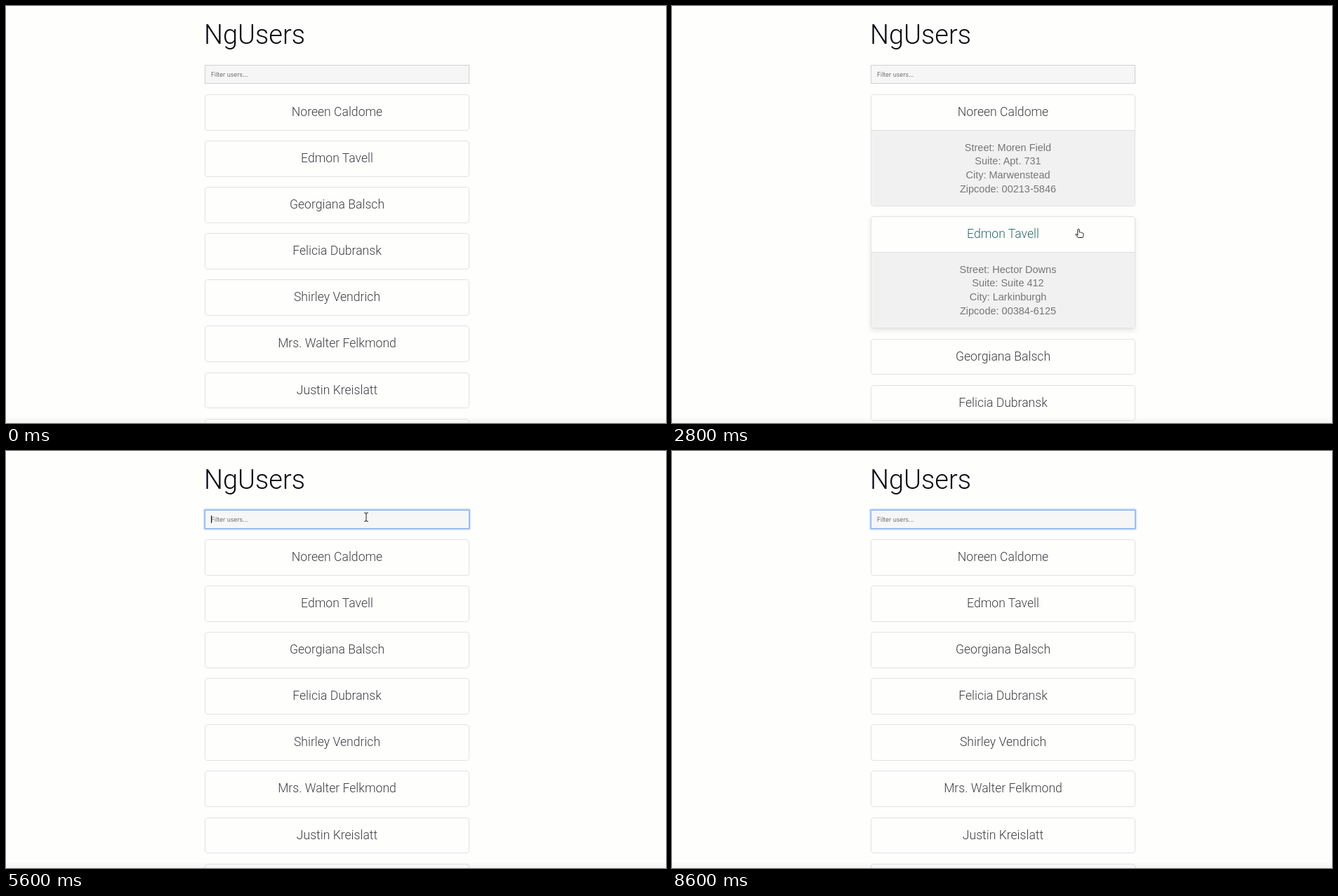
Write an HTML page that moves like this. It is 940 by 595 pixels and loops after 8800 ms.

```html
<!DOCTYPE html>
<html lang="en">
<head>
<meta charset="utf-8">
<title>NgUsers</title>
<style>
* { box-sizing: border-box; margin: 0; padding: 0; }
html, body { width: 100%; height: 100%; overflow: hidden; background: #fefefd; }
body { position: relative; font: 300 17.6px Roboto, sans-serif; color: #3f3f44; }
h1 { position: absolute; left: 282px; top: 16px; font-size: 38px; font-weight: 300; line-height: 50px; color: #0b0b12; }
#filter { position: absolute; left: 283px; top: 84px; width: 377px; height: 27px; padding-left: 8px;
  border: 1px solid #d0d0d4; background: #f6f6f7; font: 400 8.6px/26px Inter, sans-serif; color: #6c6c6c; }
#filter.focus { border-color: #86b0ef; box-shadow: 0 0 2px 1px #8fb6f2; }
#filter.typed { color: #111; }
#caret { position: absolute; top: 7px; width: 1px; height: 11px; background: #111; }
#list { position: absolute; left: 283px; top: 126px; width: 377px; }
.card { margin-bottom: 14.6px; border: 1px solid #e2e2e4; border-radius: 4px; overflow: hidden; text-align: center; }
.card.hover { box-shadow: 0 3px 7px rgba(0, 0, 0, .1); }
.card.hover .name { color: #2f6b6a; }
.name { height: 49.5px; line-height: 48.5px; }
.details { display: none; height: 108.2px; padding: 15px 0 0 14px; border-top: 1px solid #dedee0; background: #f1f1f1;
  font: 400 14.5px/19.7px "Liberation Sans", Arial, sans-serif; color: #777; white-space: pre-line; }
.open .details { display: block; }
#fade { position: absolute; left: 0; right: 0; bottom: 0; height: 10px; pointer-events: none;
  background: linear-gradient(transparent, rgba(0, 0, 0, .04)); }
#cursor { position: absolute; left: 0; top: 0; overflow: visible; pointer-events: none; }
#cursor path { stroke-linejoin: round; stroke-linecap: round; }
</style>
</head>
<body>
<h1>NgUsers</h1>
<div id="filter"><span id="query"></span><i id="caret"></i></div>
<div id="list"></div>
<div id="fade"></div>
<svg id="cursor" width="1" height="1">
  <path id="hand" fill="#fff" stroke="#222" d="M-1.2 9V1Q0-1 1.2 1V5Q2.6 4 3.4 5.4Q5 4.7 5.5 6Q7 5.6 7 7.2V9.5Q6.6 11 5.9 12.5H-.6L-4.2 8Q-3.8 6-1.2 9"/>
  <path id="beam" fill="none" stroke="#222" d="M-2.5-6Q0-6 0-4.5Q0-6 2.5-6M0-5V6M-2.5 6.5Q0 6.5 0 5Q0 6.5 2.5 6.5"/>
  <path id="arrow" fill="#111" stroke="#fff" stroke-width=".8" d="M0 0V13L3 10.2L5 14.8L7 14L5 9.5H9Z"/>
</svg>
<script>
const $ = id => document.getElementById(id);
const LOOP = 8800, STEP = 200, FOCUS = 5600, BLINK = 600;

const users = [
  { name: "Noreen Caldome", address: ["Moren Field", "Apt. 731", "Marwenstead", "00213-5846"], open: [2000, 4000] },
  { name: "Edmon Tavell", address: ["Hector Downs", "Suite 412", "Larkinburgh", "00384-6125"], open: [2800, 4600] },
  ...["Georgiana Balsch", "Felicia Dubransk", "Shirley Vendrich", "Mrs. Walter Felkmond", "Justin Kreislatt",
    "Frederic Halvorsund V", "Odette Marchen", "Wilhelmina DuBerne"].map(name => ({ name }))
];

// Places where the pointer turns or rests; it eases between them
const stops = [
  { at: 200, x: 832, y: 44 },
  { at: 800, x: 302, y: 540 },
  { at: 1200, x: 580, y: 337 },
  { at: 1600, x: 561, y: 152 },
  { at: 2000, x: 561, y: 152 },
  { at: 2800, x: 579, y: 318 },
  { at: 3600, x: 580, y: 53 },
  { at: 3800, x: 577, y: 136 },
  { at: 4800, x: 593, y: 233 },
  { at: FOCUS, x: 513, y: 94 },
  { at: 6200, x: 540, y: 335 },
  { at: 7000, x: 560, y: 53 }
];

const within = (t, [from, to]) => t >= from && t < to;
const ease = k => k * k * (3 - 2 * k);
const show = (el, visible) => el.style.display = visible ? "" : "none";

function add(parent, className, text = "") {
  const el = document.createElement("div");
  el.className = className;
  el.textContent = text;
  return parent.appendChild(el);
}

for (const user of users) {
  user.card = add($("list"), "card");
  add(user.card, "name", user.name);
  if (user.address) {
    const labels = ["Street", "Suite", "City", "Zipcode"];
    add(user.card, "details", labels.map((label, i) => `${label}: ${user.address[i]}`).join("\n"));
  }
}

function pointerAt(t) {
  const next = stops.findIndex(stop => stop.at > t);
  if (next < 1) return null;
  const a = stops[next - 1], b = stops[next];
  const k = ease((t - a.at) / (b.at - a.at));
  return [a.x + (b.x - a.x) * k, a.y + (b.y - a.y) * k];
}

function queryAt(t) {
  if (within(t, [7400, 8200])) return "ba";
  return within(t, [7000, 8400]) ? "b" : "";
}

function drawFilter(t, query) {
  const focused = t >= FOCUS;
  $("filter").classList.toggle("focus", focused);
  $("filter").classList.toggle("typed", query !== "");
  $("query").textContent = query || "Filter users...";
  $("caret").style.left = 8 + (query ? $("query").offsetWidth : 0) + "px";
  show($("caret"), focused && Math.floor((t - FOCUS) / BLINK) % 2 === 0);
}

function drawPointer(pointer) {
  show($("cursor"), pointer);
  if (!pointer) return;
  const target = document.elementFromPoint(...pointer);
  const card = target?.closest(".card");
  card?.classList.add("hover");
  const shape = card ? "hand" : target?.closest("#filter") ? "beam" : "arrow";
  for (const id of ["hand", "beam", "arrow"]) show($(id), id === shape);
  $("cursor").style.transform = `translate(${pointer[0]}px, ${pointer[1]}px)`;
}

function draw(t) {
  const query = queryAt(t);
  drawFilter(t, query);
  for (const { name, card, open } of users) {
    show(card, name.toLowerCase().includes(query));
    card.className = open && within(t, open) ? "card open" : "card";
  }
  drawPointer(pointerAt(t));
}

function tick() {
  draw(Math.floor(performance.now() % LOOP / STEP) * STEP);
  requestAnimationFrame(tick);
}
tick();
</script>
</body>
</html>
```
